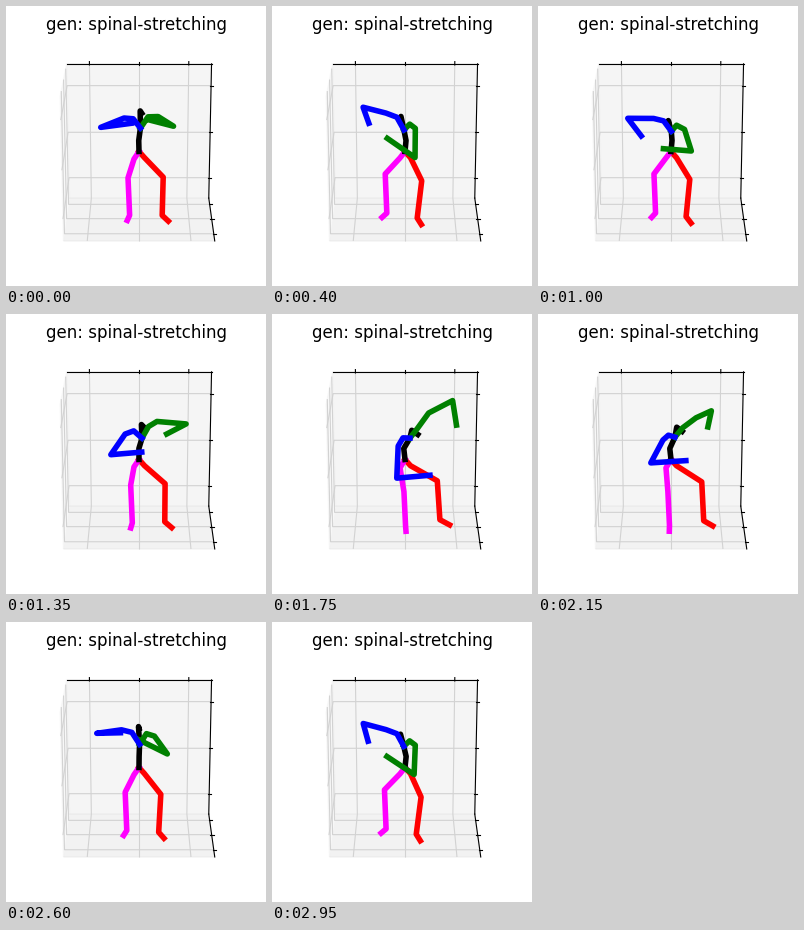
A matplotlib script for the animation above (3000 ms loop, 260 by 280 pixels).

```python
import numpy as np
import matplotlib.pyplot as plt
from matplotlib.animation import FuncAnimation

W, H, DPI = 260, 280, 100
FRAMES, STEP = 60, 50
PERIOD = 2490      # ms for one sway left, right and back
LEFT_AT = 700      # ms at which the figure leans furthest left
LIM = 1.4 * 25 / 24
PELVIS = 133 + 145.5j
COLORS = ["red", "magenta", "black", "green", "blue"]


def mover(lean, turn):
    """Joint position as a smooth loop driven by lean (-1..1) and its turn."""
    def move(rest, side=0, bend=0, swing=0, twist=0):
        return (rest + side * lean + bend * lean ** 2
                + swing * turn + twist * lean * turn)
    return move


def pose(t):
    """Five chains of joints as x + yj, in pixels from the top left."""
    phase = 2 * np.pi * (t - LEFT_AT) / PERIOD
    lean, turn = -np.cos(phase), np.sin(phase)
    body = mover(lean, turn)
    arm = mover(np.sin(lean * np.pi / 2), turn)   # arms dwell at each side

    knee = body(157 + 171j, 8.6 - 4.2j, 0, 1.5 - 1j)
    ankle = knee + body(-1.2 + 38j, 4 + 1j, 0, 0.6)
    foot = ankle + body(6.1 + 5.9j, 2.9 - 0.8j, 1, 0.6)
    right_leg = [PELVIS, body(138.5 + 151.7j), knee, ankle, foot]

    knee = body(122 + 170.7j, 10.2 + 5.6j, 2.5j, 2)
    ankle = knee + body(1.6 + 38j, -3j, -2j)
    foot = ankle + body(-2.3 + 5j, 2.8 + 1j, 0, 0.6)
    left_leg = [PELVIS, body(128 + 152.8j, 1.2j), knee, ankle, foot]

    chest = body(134.8 + 123.2j, 3 - 0.8j, 1.5j, 1 + 1j)
    neck = body(134 + 107.5j, 6, 9.5j, 1 + 3j)
    head = neck + body(1.3 + 2j, 3.5 + 1.6j, 1.8 + 1j, 0.5)
    spine = [PELVIS, body(133 + 134.5j, -1.4), chest, neck, head]

    right_arm = [
        chest,
        arm(141.5 + 112j, 3.7 - 2.8j, 5j, 0.6 + 0.8j),
        arm(150 + 111j, 6.5 - 11.5j, 1 + 1.7j, 0.5 - 2j, -2 - 3j),
        arm(171 + 121j, 16 - 30j, -10, 7.5 - 7.5j, -3j),
        arm(146 + 119j, 30 - 14j, 2 + 7j, 11 + 3j, 4 - 5j),
    ]
    left_arm = [
        chest,
        arm(126.8 + 113.6j, 2.8 + 4.7j, 1.2 + 4.5j, 0.6 + 2.7j),
        arm(117.3 + 113.8j, 5.5 + 9.8j, 3 + 5.9j, 1.2 + 5j, 1.2j),
        arm(97 + 125.7j, 14.5 + 26j, 8 + 5.7j, 5.4 + 11.7j, 7 + 4j),
        arm(125 + 124j, 28 + 15j, 0.6 + 16j, 7.4 + 12j, 3 + 3j),
    ]
    return [right_leg, left_leg, spine, right_arm, left_arm]


plt.rcParams["grid.color"] = "#d2d2d2"
fig = plt.figure(figsize=(W / DPI, H / DPI), dpi=DPI)

room = fig.add_axes([15 / W, 17.4 / H, 230 / W, 230 / H], projection="3d")
room.view_init(elev=110, azim=-90)
room.set(xlim=(-LIM, LIM), ylim=(-LIM, LIM), zlim=(-LIM, LIM))
for axis in (room.xaxis, room.yaxis, room.zaxis):
    axis.set_ticks([-1, 0, 1], labels=[])
room.set_title("gen: spinal-stretching", fontsize=12)

stage = fig.add_axes([0, 0, 1, 1])
stage.set(xlim=(0, W), ylim=(H, 0))
stage.axis("off")
limbs = [stage.plot([], [], color=color, lw=4)[0] for color in COLORS]


def draw(frame):
    for limb, chain in zip(limbs, pose(frame * STEP)):
        limb.set_data(np.real(chain), np.imag(chain))
    return limbs


anim = FuncAnimation(fig, draw, frames=FRAMES, interval=STEP,
                     repeat=True, repeat_delay=0)
plt.show()
```
